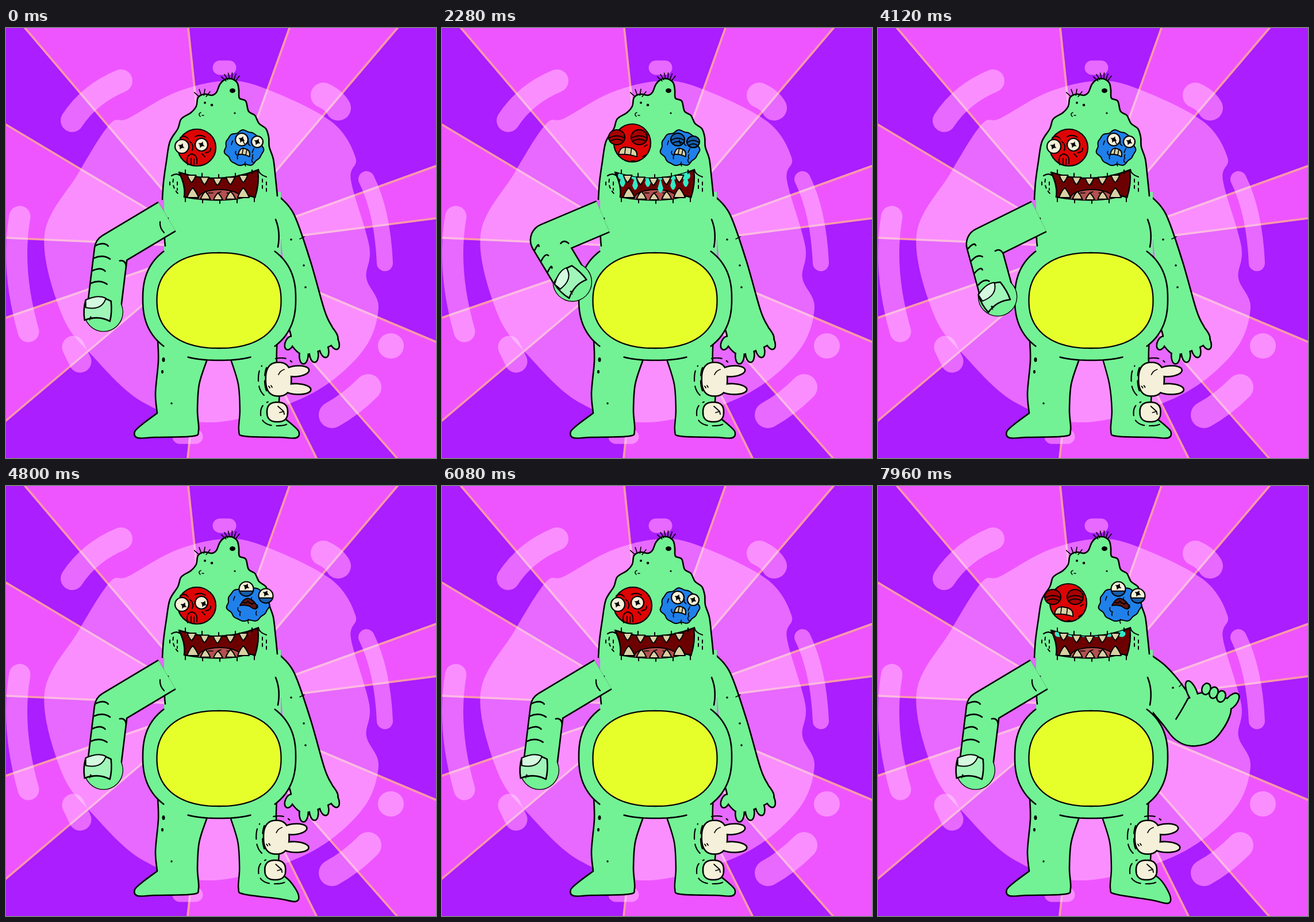
Animation of 748 by 748 pixels, one loop 8 s. Source, as an HTML page with a canvas:

```html
<!DOCTYPE html>
<html lang="en">
<head>
<meta charset="utf-8">
<title>Green monster</title>
<style>
  html, body { margin: 0; height: 100%; overflow: hidden; }
  canvas { display: block; width: 100vw; height: 100vh; }
</style>
</head>
<body>
<canvas width="748" height="748"></canvas>
<script>
const ctx = document.querySelector('canvas').getContext('2d');
const { PI, sin, cos, abs, sign, hypot, atan2 } = Math;
const GREEN = '#73f195', CREAM = '#f5f0d9', FANG = '#d9d0a4', TEAL = '#32ebc6';
const RED = '#de0404', DARK_RED = '#a80000', BLUE = '#1f80ea', DARK_BLUE = '#155fae';
const LINE = 2.6;

// "x,y x,y / x,y": smooth runs, with a corner at every slash
function curve(text, closed) {
  const runs = text.split('/').map(run => run.trim().split(/\s+/).map(p => p.split(',').map(Number)));
  const path = new Path2D(), wrap = closed && runs.length === 1;
  let last;
  path.moveTo(...runs[0][0]);
  for (const run of runs) {
    const p = last ? [last, ...run] : run, n = p.length;
    const at = i => p[wrap ? (i + n) % n : Math.max(0, Math.min(n - 1, i))];
    for (let i = 0; i < (wrap ? n : n - 1); i++) {
      const [a, b, c, d] = [at(i - 1), at(i), at(i + 1), at(i + 2)];
      path.bezierCurveTo(b[0] + (c[0] - a[0]) / 6, b[1] + (c[1] - a[1]) / 6,
        c[0] - (d[0] - b[0]) / 6, c[1] - (d[1] - b[1]) / 6, ...c);
    }
    last = p[n - 1];
  }
  return path;
}

function ellipse(x, y, rx, ry, turn = 0, from = 0, to = 2 * PI) {
  const path = new Path2D();
  path.ellipse(x, y, rx, ry, turn, from, to);
  if (to - from < 6) path.closePath();
  return path;
}

// Superellipse arc, angles in degrees
function squircle(cx, cy, rx, ry, n, from = 0, to = 360) {
  const path = new Path2D(), bow = v => sign(v) * abs(v) ** (2 / n);
  for (let d = from; d <= to; d += 2)
    path.lineTo(cx + rx * bow(cos(d * PI / 180)), cy + ry * bow(sin(d * PI / 180)));
  return path;
}

function lumpy(cx, cy, rx, ry) {
  const path = new Path2D();
  for (let a = 0; a < 6.3; a += .05) {
    const r = 1 + .035 * sin(7 * a) + .03 * sin(11 * a + 1);
    path.lineTo(cx + rx * r * cos(a), cy + ry * r * sin(a));
  }
  return path;
}

function fill(path, color) { ctx.fillStyle = color; ctx.fill(path); }
function stroke(path, width = LINE, color = '#000') {
  ctx.strokeStyle = color;
  ctx.lineWidth = width;
  ctx.stroke(path);
}
function paint(path, color, width) { fill(path, color); stroke(path, width); }
const line = (d, width) => stroke(new Path2D(d), width);
const dot = (x, y, rx, ry = rx) => fill(ellipse(x, y, rx, ry), '#000');

// Several shapes with one common outline
function merge(color, ...paths) {
  paths.forEach(p => stroke(p, LINE * 2));
  paths.forEach(p => fill(p, color));
}

function dashed(pattern, draw) {
  ctx.setLineDash(pattern);
  draw();
  ctx.setLineDash([]);
}

function group(x, y, turn, draw) {
  ctx.save();
  ctx.translate(x, y);
  ctx.rotate(turn);
  draw();
  ctx.restore();
}

const times = (n, f) => Array.from({ length: n }, (_, i) => f(i));

// Eased value from pairs of time, value
function key(t, ...k) {
  if (t <= k[0]) return k[1];
  for (let i = 2; i < k.length; i += 2) if (t < k[i]) {
    const f = (t - k[i - 2]) / (k[i] - k[i - 2]);
    return k[i - 1] + (k[i + 1] - k[i - 1]) * f * f * (3 - 2 * f);
  }
  return k[k.length - 1];
}
const bump = (t, mid, half) => abs(t - mid) < half ? cos((t - mid) / half * PI / 2) ** 2 : 0;

const RAYS = '33,0 317,0 493,0 681,0 748,240 748,331 748,546 680,748 540,748 316,748 0,683 0,504 0,365 0,168'
  .split(' ').map(p => p.split(',')).map(([x, y]) => atan2(y - 381, x - 357));
const HALO = curve('380,92 295,112 213,157 180,168 125,254 67,360 97,498 152,572 240,652 360,686 520,642 618,565 648,487 627,435 632,380 600,265 608,225 565,162 450,105', true);
const GLOWS = {
  'M115 161Q145 115 200 92': 40, 'M372 69H388': 25, 'M552 117Q570 125 578 139': 44,
  'M627 263Q655 320 659 409': 28, 'M669 553h1': 44, 'M567 673Q600 655 630 625': 46,
  'M24 328Q8 420 39 528': 37, 'M117 555L129 580': 39, 'M302 711H330': 25
};

function background() {
  const spoke = a => [357 + 900 * cos(a), 381 + 900 * sin(a)];
  RAYS.forEach((a, i) => {
    const wedge = new Path2D();
    [[357, 381], spoke(a), spoke(RAYS[(i + 1) % RAYS.length])].forEach(p => wedge.lineTo(...p));
    fill(wedge, i % 2 ? '#aa1eff' : '#ee55ff');
  });
  for (const a of RAYS) line2(spoke(a));
  ctx.globalCompositeOperation = 'screen';
  fill(HALO, '#b755a8');
  for (const d in GLOWS) stroke(new Path2D(d), GLOWS[d], '#b755a8');
  ctx.globalCompositeOperation = 'source-over';
}
function line2([x, y]) { stroke(new Path2D(`M357 381L${x} ${y}`), 3.6, '#ff99aa'); }

const HEAD = curve('272,298 274,268 279,232 285,198 299,175 305,158 322,147 331,136 334,121 345,115 358,117 366,112 372,98 380,90 391,88 402,95 405,108 406,122 417,127 422,145 433,152 440,166 452,175 457,190 458,207 465,228 469,262 472,292');
const belly = (from, to) => squircle(371, 471, 133, 107, 2.4, from, to);

function body() {
  fill(HEAD, GREEN);
  fill(belly(), GREEN);
  ctx.fillRect(275, 285, 203, 130);
  stroke(HEAD);
  [[-47, 47], [70, 110], [133, 227]].forEach(range => stroke(belly(...range)));
  line('M282 331Q273 350 277 379M469 333Q478 355 473 381');
  paint(squircle(370.5, 474, 108, 83, 2.3), '#e6ff2b', 2.3);
  const hairs = (x, y, r, n) => times(n, i => group(x, y, -.75 + 1.5 * i / (n - 1), () => line(`M0 ${-r}l-1 -11`, 1.6)));
  hairs(391, 101, 12, 6);
  hairs(342, 126, 9, 4);
  dot(394, 109, 5, 4);
  dot(346, 130, 2);
  dot(358, 134, 2.3);
  dot(398, 148, 1.6);
  line('M339 147q-6 2 -1 7M341 152h3', 1.5);
}

function leftArm(s) {
  const k = key(s, 530, 0, 740, 1, 860, 1, 1160, .5, 1400, 0);
  const ex = 183, ey = 386 - 17 * k, angle = (97 - 38 * k) * PI / 180, length = 109 - 24 * k;
  const tip = [ex + length * cos(angle), ey + length * sin(angle)];
  const thumb = ellipse(...tip, 33, 33);
  const bone = new Path2D(`M280 328L${ex} ${ey}L${tip}`);
  ctx.lineCap = 'butt';
  stroke(bone, 61);
  stroke(thumb);
  stroke(bone, 61 - 2 * LINE, GREEN);
  ctx.lineCap = 'round';
  fill(thumb, GREEN);
  // Local x runs along the forearm, y points to its outer side
  group(ex, ey, angle, () => {
    times(4, i => {
      const x = 22 * i - 4 + 8 * k, end = 6 - 6 * (i % 2) + 12 * k;
      line(`M${x} 28Q${x - 9} 14 ${x - 2} ${end}`);
    });
    line('M24 -29Q14 -26 17 -17');
  });
  group(...tip, (angle - 97 * PI / 180) * (1.7 - .4 * k), () => {
    ctx.translate(-9 + 8 * k, -4);
    paint(new Path2D('M-22 -17Q0 -27 22 -15Q24 5 20 20Q0 9 -24 18Q-27 0 -22 -17Z'), '#a0f5b9');
    paint(new Path2D('M-22 -17Q0 -27 13 -20Q6 2 -22 -4Z'), '#d5fae0', 2);
    line('M-15 18l1 -6M-11 16l-2 -4', 1.3);
  });
  if (k < .1) line('M268 337Q267 348 275 356', 2.2);
}

const ARM = curve('472,292 491,311 505,337 529,408 553,492 566,520 / 574,545 520,567 495,548 / 497,535 492,518');
const FOREARM = curve('519,407 530,389 540,371 / 566,361 612,372 / 612,395 599,422 578,444 545,451 518,440 495,412 468,380');

function rightArm(t) {
  if (t < 7540) {
    const sway = 6 * bump(t, 1300, 300) + 3 * bump(t, 2680, 300) + 7.5 * bump(t, 3560, 400)
      + 5 * bump(t, 5240, 340) + 7.5 * bump(t, 6560, 420) + 9 * bump(t, 7540, 140);
    group(470, 300, -sway * PI / 180, () => {
      ctx.translate(-470, -300);
      const fingers = times(4, i => ellipse(518 + 17.5 * i, 569 - 2.7 * i * i, 6.5, 14, .05 - .15 * i));
      merge(GREEN, ARM, ...fingers, ellipse(493, 548, 6, 11, .4));
      dot(496, 368, 1.8);
      dot(518, 413, 1.8);
      dot(521, 451, 1.8);
      line('M511 367l8 -4', 1.5);
    });
    return;
  }
  fill(curve('472,292 497,310 519,333 537,357 / 537,385 530,440 495,412 465,380'), GREEN);
  stroke(curve('472,292 497,310 519,333 537,357'));
  dot(513, 351, 1.8);
  line('M524 349l5 -5', 1.5);
  group(525, 420, key(t, 7540, 1.1, 7740, -.08, 7820, .1, 7940, 0), () => {
    ctx.translate(-525, -420);
    merge(GREEN, FOREARM, ellipse(546, 358, 7, 19, -.4), ellipse(615, 375, 8, 16, .7));
    times(3, i => paint(ellipse(571 + 13 * i, 353 + 6.5 * i, 7.5, 10, .3), GREEN));
  });
}

// The right leg is a mirrored left leg; tap lowers its toes
function leg(tap, lean) {
  stroke2(curve(`264,543 265,580 260,635 263,670 / 240,687 224,${702 + 12 * tap} 229,${713 + 13 * tap} 260,${712 + 8 * tap} 325,710 335,${700} 333,665 ${336 + lean},620 349,579`));
}
const stroke2 = path => paint(path, GREEN);

function legs(s) {
  const tap = key(s, 80, 0, 240, .75, 350, 1, 400, 1, 540, .12, 700, 0);
  const lean = 2 * bump(s, 1160, 260);
  leg(0, 0);
  dot(274, 577, 2.5, 4);
  dot(272, 598, 2, 3);
  dot(288, 653, 1.7);
  ctx.save();
  ctx.translate(405 + 335 * .94 - 3 * tap * .3, 0);
  ctx.scale(-.94, 1);
  leg(tap, lean);
  ctx.restore();
  group(lean - 5 * tap, 0, 0, () => {
    dashed([18, 9], () => {
      stroke(squircle(478, 611, 39, 37, 2.4, 135, 215), 2.2);
      stroke(squircle(478, 611, 28, 36, 2.4, 150, 210), 2.2);
      stroke(squircle(478, 611, 28, 37, 2.4, 255, 310), 2.2);
      stroke(squircle(472, 670, 29, 22, 2.4, 60, 240), 2.2);
    });
    merge(CREAM, squircle(474, 611, 21, 28, 2.5), ellipse(505, 597, 21, 8, -.1), ellipse(506, 628, 23, 8, .05));
    paint(squircle(472, 668, 18, 17, 2.5), CREAM);
    line('M474 603q3 -7 10 -9M457 623l2 3M461 622l2 3M473 658l10 9l-7 2M483 667l1 5', 1.8);
  });
}

const LIPS = new Path2D('M301 251Q370 274 438 247Q441 271 433 295Q424 290 412 295Q370 304 310 294Q313 275 301 251Z');

function mouth(s) {
  paint(LIPS, '#6c0000');
  ctx.save();
  ctx.clip(LIPS);
  paint(ellipse(372, 297, 38, 16), '#b3514f', 2);
  line('M352 287h8M368 287l6 -2M384 287h6', 1.5);
  const wet = key(s, 200, 0, 420, 1, 800, 1, 1060, 0);
  times(6, i => {
    const x = 314 + 22 * i, reach = 10 + 5 * (i * 4 % 5 % 3);
    const y = 257 + reach * key(s, 400 + 40 * (i % 3), 0, 740, 1) + key(s, 800, 0, 1080, 60);
    fill(ellipse(x, 257, 8 * wet, 7 * wet), TEAL);
    if (s > 400 && wet > 0) fill(new Path2D(`M${x} ${y - 16}Q${x + 3} ${y - 4} ${x + 5} ${y + 2}Q${x} ${y + 17} ${x - 5} ${y + 2}Q${x - 3} ${y - 4} ${x} ${y - 16}`), TEAL);
  });
  ctx.restore();
  const fang = (x, y, w, h) => paint(new Path2D(`M${x - w} ${y}Q${x - w * .6} ${y + h * .7} ${x} ${y + h}Q${x + w * .6} ${y + h * .6} ${x + w} ${y}Z`), FANG, 2);
  times(5, i => {
    const mid = sin(i * PI / 4);
    fang(323 + 22.5 * i, 256 + 5 * mid, 7.5, 13);
    fang(325 + 22 * i, 295 + 4 * mid, 10 - 2 * mid, -17 + 5 * mid);
    line(`M${312 + 29 * i} ${247 + 8 * mid}v6M${312 + 30 * i} ${296 + 3 * mid}v6`, 2);
  });
  line('M288 257q8 -5 14 -1M439 246q1 9 14 13', 2.2);
  dashed([5, 6], () => line('M285 268v6M291 263Q288 278 302 291M298 268v14M446 263v22M453 268v20', 2));
}

function eyeball(x, y, r, dx = 0, dy = 0) {
  paint(ellipse(x, y, r, r), CREAM, 2.2);
  dot(x + dx, y + dy, 3.2);
  line(`M${x + dx - 4} ${y + dy - 2}l8 4m-6 2l4 -8`, 1.8);
}
const upperLid = (x, y, r, color) => paint(ellipse(x, y, r, r, 0, PI + .1, 2 * PI - .1), color, 2);
const lowerLid = (x, y, r, color) => paint(ellipse(x, y, r, r, 0, .3, PI - .3), color, 2);
function closedEye(x, y, r, color) {
  paint(ellipse(x, y, r + 1, r), color, 2.2);
  line(`M${x - r} ${y + 1}q${r} -7 ${2 * r} 0M${x - r + 3} ${y + 6}q${r - 3} -5 ${2 * r - 6} 0`, 1.8);
}

function teeth(x, y, w, h, turn) {
  group(x, y, turn, () => {
    paint(new Path2D(`M${-w} ${h}Q${-w} ${-h * 1.3} 0 ${-h}Q${w} ${-h} ${w} ${h}Q0 ${h * .5} ${-w} ${h}Z`), FANG, 2);
    line(`M${-w * .35} ${-h}v${h * 1.6}M${w * .3} ${-h}v${h * 1.6}`, 1.6);
  });
}

// Short skin folds set around the rim of an eye
const folds = (x, y, r, n) => times(n, i => {
  const a = .5 + i * 2.4, d = r * (.7 + .2 * sin(i * 5));
  line(`M${x + d * cos(a)} ${y + d * sin(a)}q-2 4 ${3 * sin(i)} 7`, 1.6);
});

function redEye(u) {
  const sleepy = u > 280 && u < 900;
  if (sleepy || (u > 1840 && u < 2720)) {
    group(sleepy ? -2 : 0, sleepy ? 4 : key(u, 1880, 3, 2280, 0, 2700, 3), 0, () => {
      paint(ellipse(331, 200, 32, 33), RED, 2.2);
      for (const x of sleepy ? [296, 337] : [304, 343]) {
        if (!sleepy) { closedEye(x, 190, 13, DARK_RED); continue; }
        eyeball(x, 192, 13, -2, 0);
        upperLid(x, 191, 13, DARK_RED);
        lowerLid(x, 193, 13, DARK_RED);
      }
      teeth(324, 215, 16, 7, .12);
      line('M352 206l5 -3M349 224l5 -3M329 231h6', 1.6);
    });
    return;
  }
  const away = u > 1400 ? 4 : 0;
  paint(ellipse(332, 208, 33, 32), RED, 2.2);
  eyeball(306, 206, 12, away - 1, away / 2);
  eyeball(340, 203, 11, away, away / 2);
  line('M303 191q8 -6 14 2M319 197q9 6 5 16M329 189q9 -5 18 1M316 238Q312 221 323 219Q334 221 332 236M322 227v11M327 228v9M347 217q10 -1 9 -8M341 219l5 5', 1.8);
}

function blueEye(u) {
  if (u > 1480 && u < 2180) {
    paint(lumpy(421, 205, 36, 30), BLUE, 2);
    for (const [x, y] of [[418, 179], [452, 191]]) {
      eyeball(x, y, 12.5, 0, -4);
      lowerLid(x, y, 12.5, DARK_BLUE);
    }
    paint(new Path2D('M407 208Q420 182 438 210Q434 218 424 209Q414 206 407 208Z'), '#5d1613', 2);
    line('M412 202q5 4 9 -2q4 7 10 4', 2);
    folds(418, 208, 29, 7);
    return;
  }
  const blink = abs(u - 1160) < 80 || abs(u - 2290) < 70;
  const low = u > 360 && u < 900 ? 4 : 0;
  paint(lumpy(414, 209, 33, 30), BLUE, 2);
  for (const [x, y, r] of [[410, 194, 11], [437, 198, 10]])
    blink ? closedEye(x, y, r, DARK_BLUE) : eyeball(x, y, r, -low, low * .7);
  teeth(415, 216, 10, 6, .2);
  folds(413, 211, 27, 9);
}

function draw(t) {
  const step = t % 1520, look = t % 3040;
  background();
  rightArm(t);
  legs(step);
  body();
  leftArm(step);
  mouth(step);
  redEye(look);
  blueEye(look);
}

ctx.lineCap = ctx.lineJoin = 'round';
function frame() {
  draw(Math.floor(performance.now() % 8000 / 40) * 40);
  requestAnimationFrame(frame);
}
frame();
</script>
</body>
</html>
```
